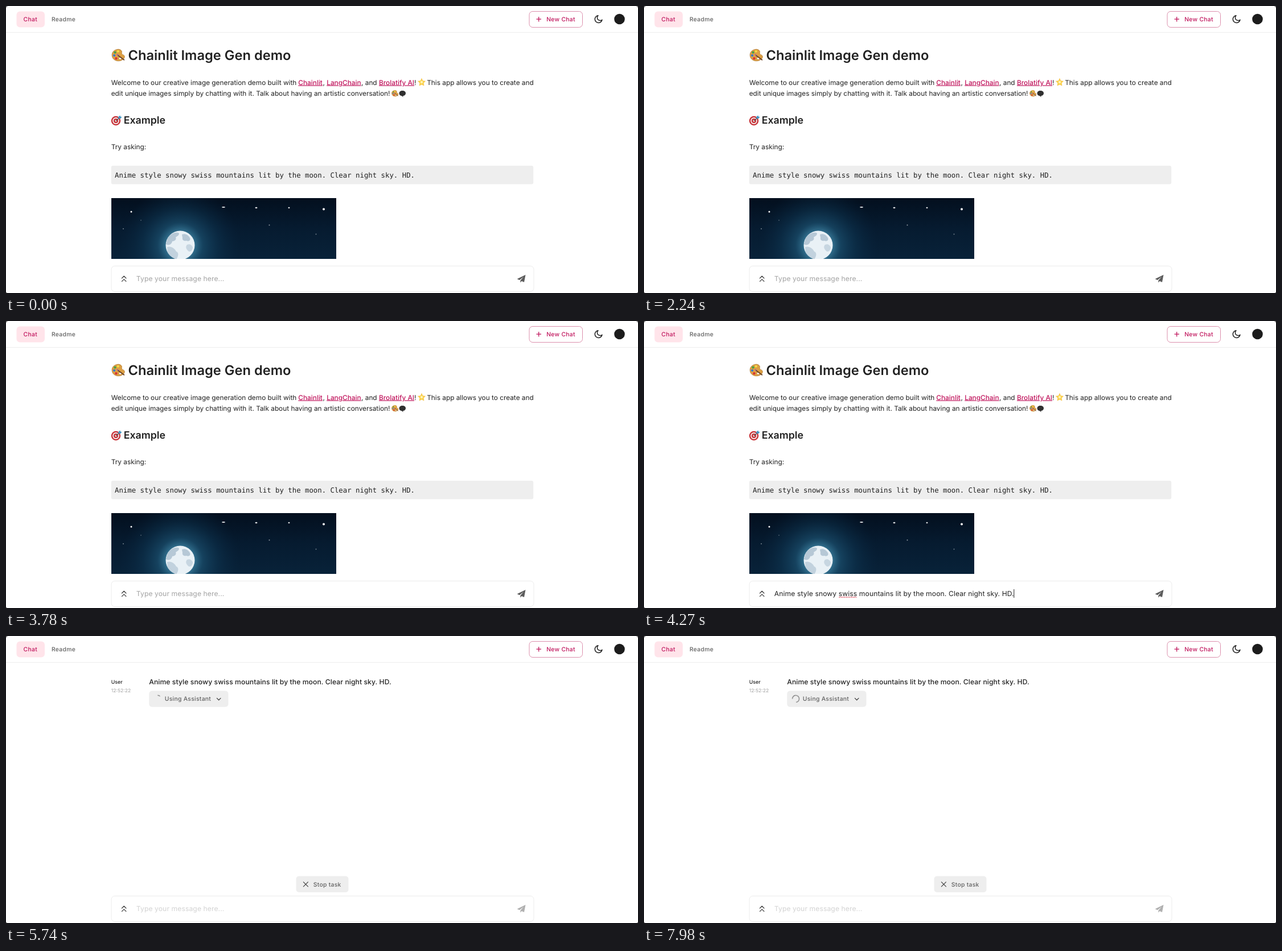
Write an HTML page that moves like this. It is 1110 px wide and 505 px high and loops after 8000 ms.

```html
<!DOCTYPE html>
<html lang="en">
<head>
<meta charset="utf-8">
<title>Image chat demo</title>
<style>
  html, body { margin: 0; width: 100%; height: 100%; overflow: hidden; background: #fff; }
  svg { display: block; }
  text {
    font: 400 11.84px Inter, sans-serif;
    font-optical-sizing: none;
    text-rendering: geometricPrecision;
    fill: #212121;
    white-space: pre;
  }
  .title { font-size: 23.68px; font-weight: 600; }
  .subtitle { font-size: 17.76px; font-weight: 600; }
  .link { font-weight: 500; fill: #c0145c; text-decoration: underline; text-decoration-thickness: 1px; text-underline-offset: 2px; }
  .code { font: 12.34px "DejaVu Sans Mono", monospace; }
  .button { font-size: 10.36px; font-weight: 500; letter-spacing: .28px; fill: #616161; }
  .accent { fill: #c0145c; }
  .field { font-size: 12.15px; letter-spacing: .09px; }
  .message { font-weight: 500; }
  .author { font-size: 8.88px; font-weight: 500; }
  .stamp { font-size: 8.6px; fill: #a3a3a3; }
  .line { fill: none; stroke: #424242; stroke-width: 1.3; stroke-linecap: round; stroke-linejoin: round; }
</style>
</head>
<body>
<svg width="1110" height="505" viewBox="0 0 1110 505">
  <defs>
    <linearGradient id="sky" x2="0" y2="1">
      <stop offset="0" stop-color="#030f1e"/>
      <stop offset=".5" stop-color="#061b30"/>
      <stop offset="1" stop-color="#082239"/>
    </linearGradient>
    <radialGradient id="glow">
      <stop offset=".2" stop-color="#3f86a6" stop-opacity=".9"/>
      <stop offset=".38" stop-color="#1d5575" stop-opacity=".65"/>
      <stop offset=".65" stop-color="#11405f" stop-opacity=".35"/>
      <stop offset="1" stop-color="#0b2c48" stop-opacity="0"/>
    </radialGradient>
    <clipPath id="photo"><path d="M185 338H580V445H185Z"/></clipPath>
    <clipPath id="disc"><circle cx="306" cy="421" r="25.5"/></clipPath>
    <symbol id="palette" viewBox="0 0 26 24" overflow="visible">
      <path d="M10 1C4 2 0 7 1 13c1 7 8 10 14 9 5-1 9-4 9-8 0-3-4-3-5-5-1-3 1-4-1-6-2-2-5-3-8-2Z" fill="#dda044" stroke="#a96f25" stroke-width=".7"/>
      <ellipse cx="16" cy="17.5" rx="2.6" ry="2" fill="#fff" stroke="#a96f25" stroke-width=".6"/>
      <circle cx="5" cy="12" r="2.2" fill="#3478d4"/>
      <circle cx="6.5" cy="6.5" r="2.2" fill="#43a047"/>
      <circle cx="12" cy="4.5" r="2.1" fill="#f6df45"/>
      <circle cx="8.5" cy="17.5" r="2.3" fill="#d83434"/>
      <path d="M12 12 23 20" stroke="#6b4326" stroke-width="2" stroke-linecap="round"/>
      <path d="m9 9 4 2-1 2Z" fill="#8e4ab8"/>
    </symbol>
  </defs>

  <rect width="1110" height="505" fill="#fff"/>

  <!-- Header -->
  <path d="M0 46.5H1110" stroke="#eeeeee"/>
  <rect x="18.5" y="9.5" width="49.5" height="28" rx="6" fill="#ffe4ea"/>
  <text x="30.6" y="26.8" class="button accent">Chat</text>
  <text x="80" y="26.8" class="button">Readme</text>
  <rect x="919" y="9.5" width="93.5" height="28" rx="6" fill="#fff" stroke="#dc8fac"/>
  <path d="M931.5 23.2H940M935.7 19V27.5" stroke="#c0145c" stroke-width="1.3"/>
  <text x="949.2" y="26.8" class="button accent">New Chat</text>
  <path d="M1040 16.8A6.4 6.4 0 1 0 1047 24.2A4.9 4.9 0 0 1 1040 16.8Z" class="line" style="stroke:#1f1f1f;stroke-width:1.5"/>
  <circle cx="1077.5" cy="23" r="9.3" fill="#1c1c1c"/>

  <g id="welcome">
    <use href="#palette" x="185" y="75.5" width="25.5" height="23"/>
    <text x="214.6" y="95" class="title">Chainlit Image Gen demo</text>

    <text x="184.7" y="138.5">Welcome to our creative image generation demo built with</text>
    <text x="513.3" y="138.5" class="link">Chainlit</text>
    <text x="556.6" y="138.5">,</text>
    <text x="563.2" y="138.5" class="link">LangChain</text>
    <text x="624" y="138.5">, and</text>
    <text x="655" y="138.5"><tspan class="link">Brolatify AI</tspan>!</text>
    <path d="m730 127.5 2 4.2 4.5.6-3.3 3.2.8 4.6-4-2.2-4 2.2.8-4.6-3.3-3.2 4.5-.6Z" fill="#fbd44c" stroke="#f3b93c" stroke-width=".6" stroke-linejoin="round"/>
    <circle cx="730" cy="134" r="2.2" fill="#fff3b4"/>
    <text x="739.2" y="138.5">This app allows you to create and</text>
    <text x="184.7" y="158">edit unique images simply by chatting with it. Talk about having an artistic conversation!</text>
    <use href="#palette" x="677" y="148" width="13" height="12"/>
    <path d="M696 149c4 0 6 2 6 4.5s-2 4.5-5 4.5l1 2.2-3.5-2.3c-2.5-.4-4-2-4-4.2 0-2.700 2.500-4.700 5.500-4.700Z" fill="#303030"/>

    <circle cx="193" cy="202" r="8.2" fill="#c62f35"/>
    <circle cx="193" cy="202" r="5.900" fill="#f4eeee"/>
    <circle cx="193" cy="202" r="4" fill="#c62f35"/>
    <circle cx="193" cy="202" r="1.700" fill="#f4eeee"/>
    <path d="m193 202 6-5" stroke="#444" stroke-width="1.1"/>
    <path d="m197 198 .5-3 3-2.500.6 2.200 2.400.5-2.500 3Z" fill="#3f96c4"/>
    <text x="206.700" y="207.400" class="subtitle">Example</text>

    <text x="184.700" y="251.600">Try asking:</text>
    <rect x="184.700" y="281" width="741.500" height="32.500" rx="3" fill="#eeeeee"/>
    <text x="191" y="301.500" class="code" data-prompt></text>

    <g clip-path="url(#photo)">
      <rect x="185" y="338" width="395" height="107" fill="url(#sky)"/>
      <circle cx="306" cy="421" r="105" fill="url(#glow)"/>
      <g id="stars" fill="#fff"></g>
      <circle cx="306" cy="421" r="25.500" fill="#e9f1f6"/>
      <g clip-path="url(#disc)" fill="#b6c8d6">
        <path d="M284 408c5-7 13-11 19-9 3 3-2 6-5 8 2 4-2 7-6 7-1 6-7 8-11 5Z"/>
        <path d="M309 402c6-2 11 1 14 6 2 4-2 7-6 5-4 1-8-1-7-5Z"/>
        <path d="M283 424c7-2 13 2 16 8 5 2 4 8 0 14H284Z" opacity=".75"/>
        <path d="M318 420c5-2 9 1 10 5-1 7-6 9-9 5-3-3-4-7-1-10Z" opacity=".65"/>
      </g>
    </g>
  </g>

  <g id="chat">
    <text x="184.700" y="84" class="author">User</text>
    <text x="184.700" y="99" class="stamp">12:52:22</text>
    <text x="251.200" y="85.300" class="field message" data-prompt></text>
    <rect x="251.300" y="96.500" width="139.200" height="28.300" rx="5" fill="#eeeeee"/>
    <g transform="translate(266.500 110.500) scale(.3)">
      <circle id="spinner" r="20.200" fill="none" stroke="#616161" stroke-width="3.600"/>
    </g>
    <text x="278.800" y="114.400" class="button">Using Assistant</text>
    <path d="m370.400 109.400 3.300 3.300 3.300-3.300" class="line"/>
    <rect x="509.500" y="422.500" width="92" height="28.500" rx="5" fill="#eeeeee"/>
    <path d="m522.400 432.800 8 8m0-8-8 8" class="line" style="stroke-width:1.200"/>
    <text x="539.800" y="440.600" class="button">Stop task</text>
  </g>

  <!-- Message field -->
  <rect x="185" y="457.500" width="742" height="45" rx="6" fill="none" stroke="#ececec"/>
  <path d="m203.500 479 3.700-3.700 3.700 3.700m-7.400 5.600 3.700-3.700 3.700 3.700" class="line"/>
  <text id="placeholder" x="228.800" y="484" class="field">Type your message here...</text>
  <g id="draft">
    <text x="228.800" y="484" class="field" data-prompt></text>
    <path d="M342.500 486H373.500" stroke="#d93a4c" stroke-width="1.600" stroke-dasharray="1.700 1.300"/>
  </g>
  <rect id="caret" y="472" width="1" height="15" fill="#212121"/>
  <path id="send" d="M912.500 473 897.700 480.300 901.800 482.200 909 476.500 903.400 483 903.400 486.800 905.600 484 910 486Z"/>

  <path d="M0 0H3L0 3ZM1110 0H1107L1110 3ZM0 505V503L2 505ZM1110 505V503L1108 505Z" fill="#777"/>
</svg>
<script>
const LOOP = 8000, STEP = 70;
const CARET_ON = 3010, CARET_OFF = 3500, CARET_BACK = 3990, PASTE = 4130, SEND = 4480;
const SPIN = 21 * STEP;
const prompt = 'Anime style snowy swiss mountains lit by the moon. Clear night sky. HD.';

const $ = id => document.getElementById(id);
const show = (id, on) => { $(id).style.display = on ? '' : 'none'; };

document.querySelectorAll('[data-prompt]').forEach(el => { el.textContent = prompt; });

// x, y, horizontal radius, vertical radius, opacity
const stars = [
  [220, 362, 1.5, 1.5, 1], [382, 354, 3, 1, .9], [439.5, 355, 2, 1.2, .85],
  [497, 355, 1.5, 1.2, .85], [558, 357.5, 2, 2, 1], [206, 392, 1, 1, .45],
  [237, 377, .8, .8, .45], [462.5, 385.5, 1, 1, .6], [544.5, 401.5, 1, 1, .45]
];
$('stars').innerHTML = stars.map(([x, y, rx, ry, o]) =>
  `<ellipse cx="${x}" cy="${y}" rx="${rx}" ry="${ry}" opacity="${o}"/>`).join('');

const timing = { duration: SPIN, iterations: Infinity };
const spins = [
  $('spinner').animate({ transform: ['rotate(0deg)', 'rotate(360deg)'] }, timing),
  $('spinner').animate([
    { strokeDasharray: '1px 200px', strokeDashoffset: '0px', easing: 'ease-in-out' },
    { strokeDasharray: '100px 200px', strokeDashoffset: '-15px', easing: 'ease-in-out' },
    { strokeDasharray: '100px 200px', strokeDashoffset: '-125px' }
  ], timing)
];
spins.forEach(spin => spin.pause());

function draw(t) {
  const sent = t >= SEND, pasted = t >= PASTE && !sent;
  const blinkOn = (t >= CARET_ON && t < CARET_OFF) || (t >= CARET_BACK && !sent);
  show('welcome', !sent);
  show('chat', sent);
  show('placeholder', !pasted);
  show('draft', pasted);
  show('caret', blinkOn);
  $('caret').setAttribute('x', pasted ? 649.3 : 228.6);
  $('placeholder').style.fill = sent ? '#d3d3d3' : '#a3a3a3';
  $('send').setAttribute('fill', sent ? '#b0b0b0' : '#5c5c5c');
  const age = Math.max(0, Math.floor((t - SEND) / STEP) * STEP);
  spins.forEach(spin => { spin.currentTime = age + 15; });
}

const start = performance.now();
function tick() {
  draw((performance.now() - start) % LOOP);
  requestAnimationFrame(tick);
}
tick();
</script>
</body>
</html>
```
